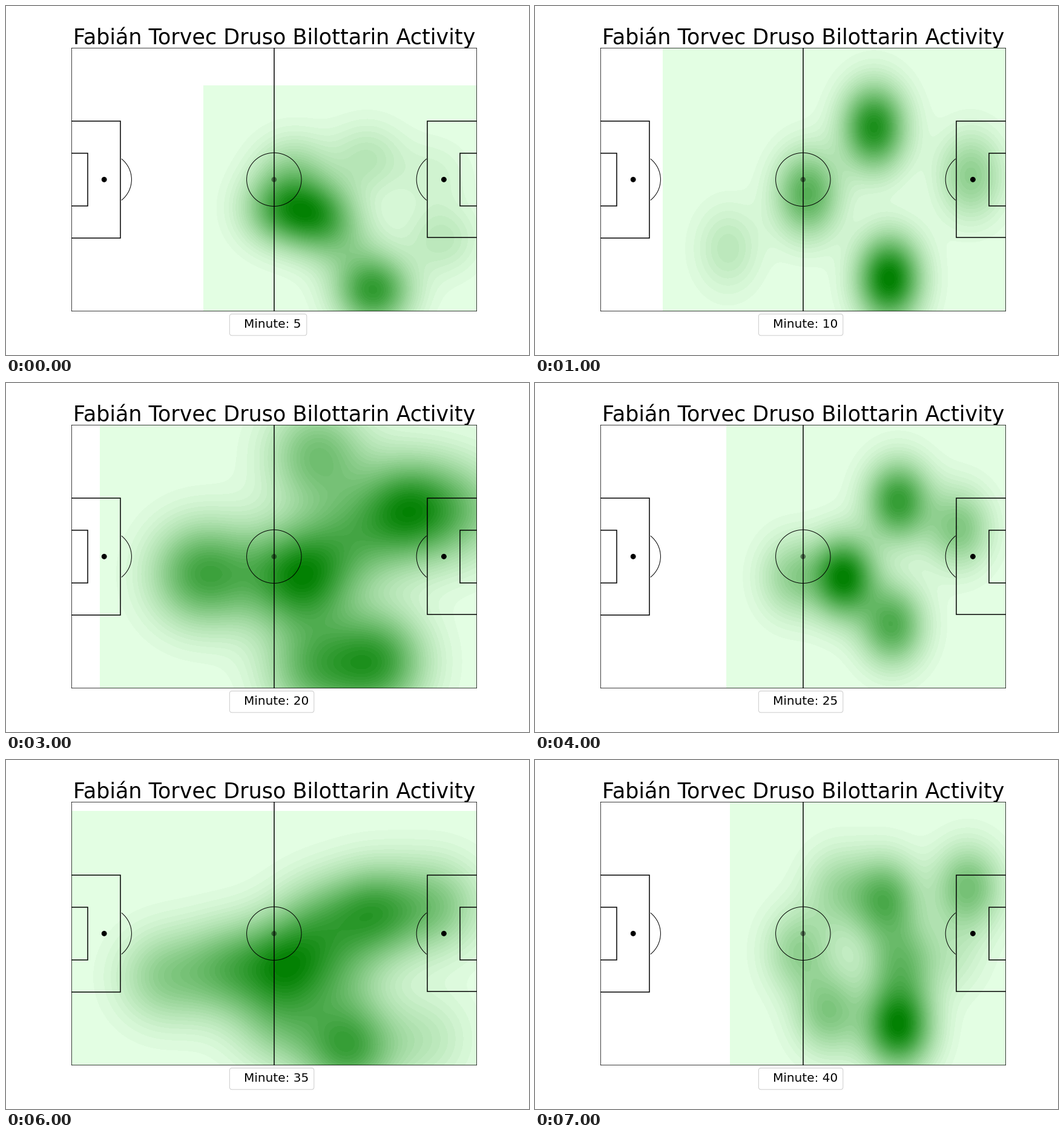
These frames come from a looping animation (864 by 576 pixels, 8000 ms). A matplotlib script:

```python
import numpy as np
import matplotlib.pyplot as plt
from matplotlib.animation import FuncAnimation
from matplotlib.colors import LinearSegmentedColormap
from matplotlib.patches import Arc, Ellipse, FancyBboxPatch

W, H, DPI = 864, 576, 72
LEFT, RIGHT, TOP, BOTTOM = 108, 777.6, 69.12, 503.6
MID_X, MID_Y = 442.8, 286.4
SPOT = 54.2
BANDS = 36
GREENS = LinearSegmentedColormap.from_list("greens", [(0.9, 1, 0.9), (0, 0.5, 0)])

scenes = []


def scene(bandwidth, *spots):
    """Add a heat map: kernel width and height, then key spots (x, y, heat)."""
    scenes.append((np.array(bandwidth), np.array(spots)))


scene((42, 40), (452, 335, .80), (515, 345, .88), (475, 270, .45),
      (560, 395, .42), (607, 470, .75), (597, 251, .20), (720, 385, .18),
      (705, 280, .10))
scene((36, 48), (319, 400, .15), (450, 310, .50), (560, 200, .70),
      (585, 450, .80), (720, 280, .30))
scene((34, 55), (328, 475, .26), (375, 400, .20), (425, 310, .33),
      (547, 195, 1), (612, 190, .62), (680, 240, .20), (735, 245, .40),
      (560, 370, .38), (570, 482, .88), (643, 455, .42))
scene((55, 57), (320, 315, .72), (400, 315, .68), (490, 320, 1),
      (570, 255, .70), (662, 210, .98), (750, 210, .60), (515, 120, .52),
      (510, 470, .70), (612, 460, .84))
scene((36, 45), (424, 320, .35), (510, 320, .90), (600, 195, .70),
      (590, 400, .60), (700, 240, .40))
scene((34, 38), (420, 360, .25), (535, 323, 1), (580, 238, .69),
      (605, 199, .60), (635, 280, .48), (700, 265, .40), (613, 397, .74),
      (550, 400, .62), (508, 465, .45), (455, 490, .22))
scene((52, 52), (262, 358, .42), (365, 345, .68), (460, 337, 1),
      (520, 270, .76), (610, 252, .83), (710, 240, .50), (550, 360, .62),
      (455, 430, .60), (565, 474, .77), (690, 460, .22))
scene((38, 47), (436, 315, .38), (485, 415, .46), (600, 440, 1),
      (605, 335, .60), (578, 230, .68), (500, 215, .36), (715, 210, .50),
      (690, 320, .20))

fig = plt.figure(figsize=(W / DPI, H / DPI), dpi=DPI, facecolor="white")


def pixel_axes(x0, x1, y0, y1):
    ax = fig.add_axes([x0 / W, 1 - y1 / H, (x1 - x0) / W, (y1 - y0) / H])
    ax.set(xlim=(x0, x1), ylim=(y1, y0))
    ax.axis("off")
    return ax


page = pixel_axes(0, W, 0, H)
pitch = pixel_axes(LEFT, RIGHT, TOP, BOTTOM)

page.text(MID_X, 63, "Fabián Torvec Druso Bilottarin Activity",
          fontsize=35, ha="center", va="baseline")
box = FancyBboxPatch((369.4, 508.4), 128, 35.4,
                     boxstyle="round,pad=0,rounding_size=4",
                     fc="white", ec="0.8", lw=1)
page.add_patch(box)
label = page.text(393.4, 531, "", fontsize=20, va="baseline")


def line(xs, ys):
    pitch.plot(xs, ys, color="black", lw=1.5, solid_joinstyle="miter", zorder=3)


def goal_box(goal, edge, top, bottom):
    line([goal, edge, edge, goal], [top, top, bottom, bottom])


def ellipse(x, width, height, **style):
    pitch.add_patch(Ellipse((x, MID_Y), width, height, zorder=2, **style))


def draw_pitch():
    line([LEFT, RIGHT, RIGHT, LEFT, LEFT], [TOP, TOP, BOTTOM, BOTTOM, TOP])
    line([MID_X, MID_X], [TOP, BOTTOM])
    goal_box(LEFT, 189, 190, 382.8)
    goal_box(LEFT, 135, 242.8, 330)
    goal_box(RIGHT, 696, 190, 382)
    goal_box(RIGHT, 750, 242.8, 330)
    ellipse(MID_X, 90.4, 88.2, fill=False, lw=1)
    ellipse(MID_X, 8.6, 8.6, fc="black", lw=0, alpha=.45)
    for x, turn in ((LEFT + SPOT, 0), (RIGHT - SPOT, 180)):
        ellipse(x, 7.8, 7.8, color="black", lw=1)
        pitch.add_patch(Arc((x, MID_Y), 90.4, 88.2, theta1=turn - 50,
                            theta2=turn + 50, lw=1, zorder=2))


def kernel(points, centres, bandwidth):
    gap = (points[..., None, :] - centres) / bandwidth
    return np.exp(-(gap ** 2).sum(axis=-1) / 2)


def density(bandwidth, spots):
    """Sum of kernels weighted so that each key spot reaches its heat."""
    centres, heats = spots[:, :2], spots[:, 2]
    weights = np.linalg.solve(kernel(centres, centres, bandwidth), heats)
    left, top = centres.min(axis=0) - 3 * bandwidth
    x = np.linspace(left, RIGHT + 2, 150)
    y = np.linspace(top, BOTTOM + 2, 130)
    grid = np.stack(np.meshgrid(x, y), axis=-1)
    z = kernel(grid, centres, bandwidth) @ np.maximum(weights, 0)
    return x, y, np.clip(z / z.max(), 1e-6, .999)


heat = None


def update(i):
    global heat
    if heat is not None:
        heat.remove()
    heat = pitch.contourf(*density(*scenes[i]), np.linspace(0, 1, BANDS + 1),
                          cmap=GREENS, zorder=1)
    pitch.set(xlim=(LEFT, RIGHT), ylim=(BOTTOM, TOP))
    minute = 5 * (i + 1)
    label.set_text(f"Minute: {minute}")
    box.set_width(127.4 if minute < 10 else 139.4)
    return heat, label, box


draw_pitch()
anim = FuncAnimation(fig, update, frames=len(scenes), interval=1000, repeat=True)
plt.show()
```
